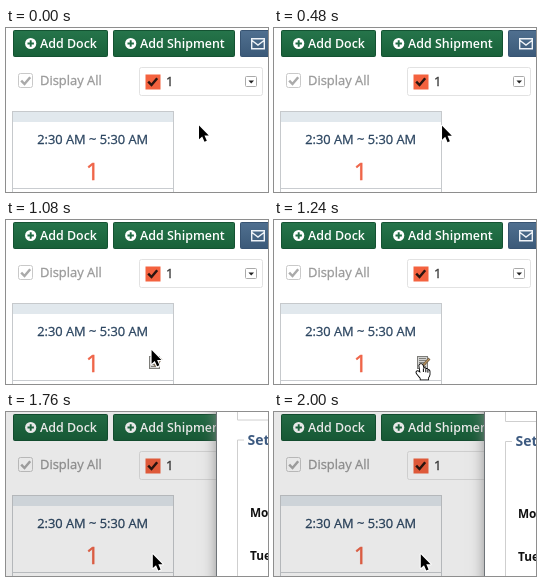
These frames come from a looping animation (262x164 px, 2.24 s). An HTML page with a canvas:

```html
<!DOCTYPE html>
<html lang="en">
<head>
<meta charset="utf-8">
<title>Dock schedule</title>
<style>
html, body { margin: 0; width: 100%; height: 100%; overflow: hidden; background: #fff; }
canvas { display: block; width: 262px; height: 164px; }
</style>
</head>
<body>
<canvas id="stage" width="262" height="164"></canvas>
<script>
const W = 262, H = 164, LOOP = 2240, STEP = 40;
const ctx = document.getElementById('stage').getContext('2d');
const clamp = v => Math.max(0, Math.min(1, v));
const span = (t, from, to) => clamp((t - from) / (to - from));
const smooth = k => k * k * (3 - 2 * k);

const ARROW = new Path2D('M0 0V13.8L3.2 10.9L5.5 16.3L7.8 15.3L5.5 10H9.8Z');
const HAND = new Path2D('M-1.7 1Q-1.4-.5 0-.5Q1.4-.5 1.8 1L2.6 4Q4.2 3.2 4.9 4.6Q6.3 4 6.9 5.4Q8.6 5.2 8.6 7.2V10Q8.2 12 7.2 13V15H-.4V13.6Q-2.2 11.4-4 9.2Q-5.2 7.4-4 6.8Q-2.6 6.3-.6 8.6Z');

function rect(x, y, w, h, fill, line) {
  ctx.fillStyle = fill;
  ctx.fillRect(x, y, w, h);
  if (!line) return;
  ctx.strokeStyle = line;
  ctx.lineWidth = 1;
  ctx.strokeRect(x + .5, y + .5, w - 1, h - 1);
}

function box(x, y, w, h, r, fill, line) {
  ctx.beginPath();
  ctx.roundRect(x + .5, y + .5, w - 1, h - 1, r);
  ctx.fillStyle = fill;
  ctx.fill();
  ctx.strokeStyle = line;
  ctx.lineWidth = 1;
  ctx.stroke();
}

// A thin stroke thickens regular text a little.
function text(str, x, y, size, color, weight = 400, align = 'left') {
  ctx.font = `${weight} ${size}px "Open Sans", sans-serif`;
  ctx.textAlign = align;
  ctx.fillStyle = ctx.strokeStyle = color;
  ctx.fillText(str, x, y);
  ctx.lineWidth = size / 45;
  if (weight === 400) ctx.strokeText(str, x, y);
}

function path(d, color, width, x = 0, y = 0) {
  ctx.save();
  ctx.translate(x, y);
  ctx.strokeStyle = color;
  ctx.lineWidth = width;
  ctx.stroke(new Path2D(d));
  ctx.restore();
}

function button(x, w, top, bottom, edge) {
  const g = ctx.createLinearGradient(0, 2, 0, 29);
  g.addColorStop(0, top);
  g.addColorStop(1, bottom);
  box(x, 2, w, 27, 1, g, edge);
}

function addButton(x, w, label) {
  button(x, w, '#26754b', '#186039', '#145232');
  ctx.beginPath();
  ctx.arc(x + 17.7, 15.5, 5.6, 0, 7);
  ctx.fillStyle = '#fff';
  ctx.fill();
  path('M-3.2 0H3.2M0-3.2V3.2', '#1f6b43', 1.9, x + 17.7, 15.5);
  text(label, x + 27, 20, 12.45, '#fff', 600);
}

const tick = (x, y, color) => path('M3.2 7.6L6.5 11L12.2 4.2', color, 2.5, x, y);

function page() {
  rect(0, 0, W, H, '#fff');
  addButton(7, 95, 'Add Dock');
  addButton(107, 122, 'Add Shipment');
  button(234, 34, '#507090', '#3b5978', '#385472');
  path('M.7.7H13.3V10.8H.7ZM1 2.5L7 7L13 2.5', '#eef2f7', 1.4, 245, 10);

  box(12, 45, 15, 15, 2, '#fff', '#c9c9c9');
  tick(12, 45, '#aaa');
  text('Display All', 34, 57, 12.9, '#999');

  box(133, 39, 124, 29, 2, '#fff', '#e2e2e2');
  rect(139.5, 46.5, 15, 15, '#f4623f');
  tick(139, 46, '#2b1510');
  text('1', 160, 58, 13, '#333');
  box(239, 48, 12, 11, 1, '#fff', '#aaa');
  ctx.fillStyle = '#222';
  ctx.fill(new Path2D('M242.5 52.5H248L245.2 55.5Z'));

  rect(6, 83, 162, 90, '#fff', '#c6c9cc');
  rect(7, 84, 160, 10, '#e1e8ed');
  rect(7, 160, 160, 1, '#c9ccd0');
  text('2:30 AM ~ 5:30 AM', 86.7, 116, 12.85, '#2b4560', 400, 'center');
  text('1', 86.5, 152, 24, '#ef664a', 400, 'center');
}

function editIcon() {
  rect(143, 136, 11, 13, '#d2d2d0', '#7d7d79');
  for (let y = 138.5; y < 147; y += 2) path('M145 0H152', '#80807c', 1, 0, y);
  path('M148.5 146L155.5 138.5', '#7d6a50', 2.6);
  path('M149.5 145L155 139', '#c99a5b', 1);
}

function panel(alpha, lift) {
  ctx.save();
  ctx.globalAlpha = alpha;
  ctx.translate(0, -lift);
  ctx.shadowColor = '#888';
  ctx.shadowBlur = 14;
  rect(211, -80, 100, 340, '#fff');
  ctx.shadowColor = 'transparent';
  rect(210, -80, 1, 340, '#6f7478');
  path('M231.5-80V9.5H280', '#cfcfcf', 1);
  path('M238 29.5H231.5V260', '#cfcfcf', 1);
  text('Settings', 241.5, 34, 14, '#3d5a80', 700);
  text('Monday', 244, 106, 11.8, '#111', 700);
  text('Tuesday', 244, 149, 11.8, '#111', 700);
  ctx.restore();
}

function pointer(shape, x, y) {
  ctx.save();
  ctx.translate(x, y);
  ctx.lineJoin = 'round';
  const hand = shape === HAND;
  ctx.strokeStyle = hand ? '#000' : '#fff';
  ctx.lineWidth = hand ? 1.7 : 2.2;
  ctx.stroke(shape);
  ctx.fillStyle = hand ? '#fff' : '#000';
  ctx.fill(shape);
  if (hand) path('M2.4 4V7.5M4.8 4.6V7.8M6.9 5.4V8.2', '#000', 1);
  ctx.restore();
}

function draw(t) {
  page();
  if (t >= 520 && t < 1600) editIcon();

  // Grey loading veil gives way to the dialog's lighter backdrop.
  if (t >= 1600) {
    const k = span(t, 1600, 1760);
    rect(0, 0, W, H, `rgba(110,110,110,${.3 * (1 - k)})`);
    rect(0, 0, W, H, `rgba(0,0,0,${.09 * k})`);
    const slide = 1 - span(t, 1600, 1840);
    if (t > 1600) panel(k, 40 * slide ** 3);
  }

  const u = span(t, 240, 640) ** 1.36;
  const v = smooth(span(t, 840, 1240));
  const x = 193 - 50 * u + 4 * v;
  const y = 97.5 + 6 * u ** 4 + 41 * v;
  if (t >= 1600) pointer(ARROW, 146.8, 142.3);
  else pointer(y > 135 ? HAND : ARROW, x, y);
}

const start = performance.now();
function frame() {
  const t = (performance.now() - start) % LOOP;
  draw(Math.floor(t / STEP) * STEP);
  requestAnimationFrame(frame);
}
frame();
</script>
</body>
</html>
```
